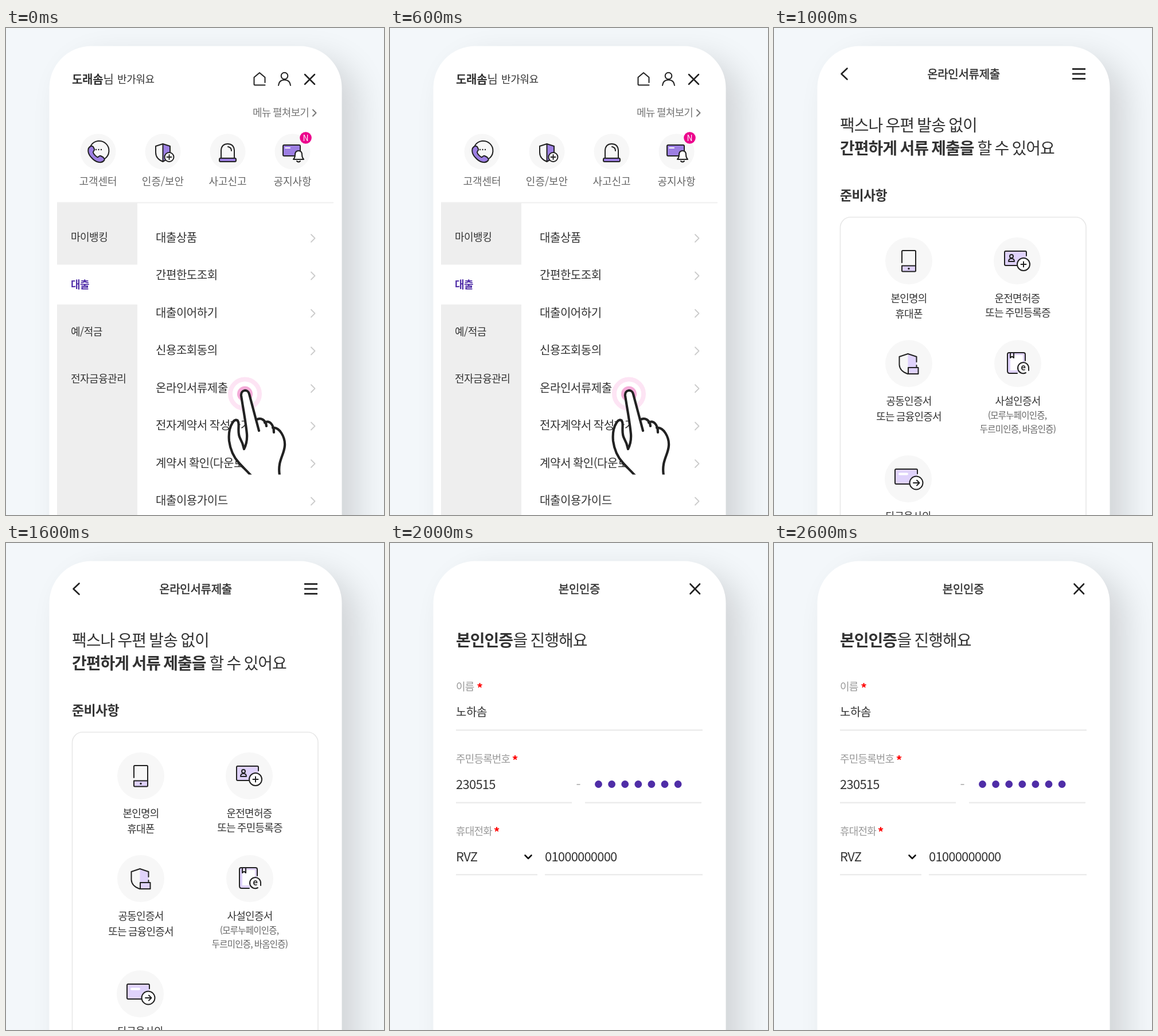
An HTML page with a canvas that plays this animation: 659x849 px, repeating every 3 s.

```html
<!DOCTYPE html>
<html lang="ko">
<head>
<meta charset="utf-8">
<style>
html, body { margin: 0; width: 100%; height: 100%; overflow: hidden; background: #f3f7fa; }
canvas { display: block; }
</style>
</head>
<body>
<canvas id="stage" width="659" height="849"></canvas>
<script>
const ctx = document.getElementById('stage').getContext('2d');
const FONT = '"Noto Sans CJK KR", "Noto Sans CJK", sans-serif';
const INK = '#222', TEXT = '#333', VIOLET = '#4f2da7', PURPLE = '#9d7fe3', LILAC = '#dfd2fb';
const SCREEN_MS = 1000;

// y is the vertical middle of the glyphs
function text(str, x, y, size, { color = TEXT, weight = 400, gap = 0, align = 'left' } = {}) {
  ctx.font = `${weight} ${size}px ${FONT}`;
  ctx.letterSpacing = `${gap}px`;
  ctx.textAlign = align;
  ctx.fillStyle = color;
  ctx.fillText(str, x, y + size * 0.38);
  if (weight === 500) {
    // a hairline outline gives the medium weight
    ctx.strokeStyle = color;
    ctx.lineWidth = 0.5;
    ctx.strokeText(str, x, y + size * 0.38);
  }
}

function shape(d, { fill, stroke = INK, width = 2 } = {}) {
  const path = new Path2D(d);
  if (fill) { ctx.fillStyle = fill; ctx.fill(path); }
  if (stroke) { ctx.strokeStyle = stroke; ctx.lineWidth = width; ctx.stroke(path); }
}

function disc(x, y, r, fill, stroke, width = 2) {
  ctx.beginPath();
  ctx.arc(x, y, r, 0, Math.PI * 2);
  if (fill) { ctx.fillStyle = fill; ctx.fill(); }
  if (stroke) { ctx.strokeStyle = stroke; ctx.lineWidth = width; ctx.stroke(); }
}

function rect(x, y, w, h, fill) {
  ctx.fillStyle = fill;
  ctx.fillRect(x, y, w, h);
}

function drawPhone() {
  rect(0, 0, 659, 849, '#f3f7fa');
  ctx.save();
  ctx.shadowColor = 'rgba(0,0,0,.14)';
  ctx.shadowBlur = 56;
  ctx.shadowOffsetX = 27;
  ctx.shadowOffsetY = 22;
  ctx.fillStyle = '#fff';
  ctx.beginPath();
  ctx.roundRect(75.5, 31.5, 510, 1000, 73);
  ctx.fill();
  ctx.restore();
}

function drawQuickIcons() {
  ['고객센터', '인증/보안', '사고신고', '공지사항'].forEach((label, i) => {
    const x = 160.5 + i * 113;
    disc(x, 215.5, 31, '#f7f7f7');
    text(label, x, 267, 18, { color: '#666', align: 'center' });
  });
  // call centre
  shape('M148 205A17 17 0 1 1 172 228');
  for (const x of [157, 161.5, 166]) disc(x, 212, 1.2, INK);
  shape('M148 206C141 209 142 219 149 226C156 234 166 237 171 231C173 229 171 227 169 225L165 223C162 222 161 226 159 225C156 223 153 220 152 217C151 215 155 214 154 211L152 207Q150 205 148 206Z', { fill: PURPLE });
  // shield
  shape('M273.5 202L286 206V219Q284 228 273.5 233Z', { fill: PURPLE, stroke: null });
  shape('M273.5 202L286 206V218Q284 228 273.5 233Q261 228 261 217V206ZM273.5 202V232');
  disc(284.5, 225, 8, '#fff', INK);
  shape('M280.5 225H288.5M284.5 221V229');
  // siren
  shape('M375 226V213Q376 202 386.500 202Q397 202 398 213V226M387 207Q393 208 393 214');
  shape('M374 227H399Q401 227 401 229V231Q401 233 399 233H374Q372 233 372 231V229Q372 227 374 227Z', { fill: PURPLE });
  // notice
  shape('M485 204H511Q513 204 513 206V221Q513 223 511 223H485Q483 223 483 221V206Q483 204 485 204Z', { fill: PURPLE });
  shape('M487 209H495', { stroke: '#fff' });
  shape('M501 229Q504 226 504 221Q504 214 510 214Q516 214 516 221Q516 226 519 229ZM507 232Q510 235 513 232', { fill: '#fff' });
  disc(522.5, 191.5, 10.3, '#ec008c');
  text('N', 522.5, 191.3, 14, { color: '#fff', align: 'center' });
}

function drawPointer() {
  disc(416.5, 638, 25.5, null, '#fde4f4', 8);
  disc(416.5, 638, 21.5, 'rgba(255,255,255,.8)');
  disc(416.5, 638, 13.5, '#f4abd8');
  ctx.save();
  ctx.beginPath();
  ctx.rect(370, 600, 140, 178.5);
  ctx.clip();
  const thumb = 'M427 780C419 771 413 766 406 758C396 747 391 735 389 720C388 709 389 697 395 688C398 683 403 681 405 687C407 693 403 706 408 715Q413 724 415 734';
  const finger = 'Q421 722 420 708C418 687 413 661 410 641C409 630 422 629 424 638L441 702';
  const palm = 'L436 683C445 678 452 684 453 688C459 683 467 691 467 698C477 695 487 714 486 728C485 745 473 754 477 780Z';
  const knuckles = 'M436 683C445 678 453 684 454 694M451 688C459 683 467 691 467 705M465 697C477 695 487 714 486 728C485 745 473 754 477 780';
  shape(thumb + finger + palm, { fill: '#fff', stroke: null });
  shape(thumb + finger, { width: 4.2 });
  shape(knuckles, { width: 4.2 });
  ctx.restore();
}

function drawMenu() {
  text('도래솜', 115, 89, 20, { weight: 700, gap: -0.3 });
  text('님', 169.5, 89, 20);
  text('반가워요', 194, 89.5, 18, { gap: -0.4 });
  shape('M451.500 99.500H434Q432.500 99.500 432.500 98V86L442 78L451.500 86V95');
  disc(485.5, 83.5, 5.8, null, INK);
  shape('M475 100Q476 90.500 485.500 90.500Q495 90.500 496 100');
  shape('M521 81L538 98M538 81L521 98', { width: 2.5 });
  text('메뉴 펼쳐보기', 430, 147.5, 18, { color: '#777', gap: -0.75 });
  shape('M535 142.500L540.500 148L535 153.500', { stroke: '#777' });
  drawQuickIcons();

  rect(89, 303.5, 482, 2, '#f0f0f0');
  rect(89, 305, 140, 107.5, '#eee');
  rect(89, 482, 140, 367, '#eee');
  ['마이뱅킹', '대출', '예/적금', '전자금융관리'].forEach((label, i) => {
    const active = i === 1;
    text(label, 113, 364.5 + i * 82.2, 18, { gap: -0.5, weight: active ? 700 : 400, color: active ? VIOLET : TEXT });
  });
  const items = ['대출상품', '간편한도조회', '대출이어하기', '신용조회동의', '온라인서류제출',
    '전자계약서 작성하기', '계약서 확인(다운로드)', '대출이용가이드'];
  items.forEach((label, i) => {
    const y = 365 + i * 65.5;
    text(label, 261, y, 20, { gap: -0.45 });
    shape(`M532 ${y - 5}L538.500 ${y + 1.5}L532 ${y + 8}`, { stroke: '#ccc', width: 1.8 });
  });
  drawPointer();
}

function drawDocumentIcons() {
  for (const [x, y] of [[235, 406], [424, 406], [235, 585], [425, 585], [234, 786]]) disc(x, y, 41, '#f7f7f7');
  // mobile
  rect(223, 414.5, 24, 10, LILAC);
  shape('M223 409V389.500Q223 388 224.500 388H245.500Q247 388 247 389.500V423Q247 424.500 245.500 424.500H224.500Q223 424.500 223 423V414.500H247');
  disc(235, 419.5, 1.7, INK);
  // identity card
  const idCard = 'M440 397V391Q440 389 438 389H404Q402 389 402 391V412Q402 414 404 414H424';
  shape(idCard + 'L440 402Z', { fill: LILAC, stroke: null });
  shape(idCard);
  disc(414, 398, 3, null, INK);
  shape('M409 407Q409 402 414 402Q419 402 419 407Z');
  disc(435, 412, 11, '#fff', INK);
  shape('M430.500 412H439.500M435 407.500V416.500');
  // joint certificate
  shape('M233.500 568L248.500 573V592H233.500Z', { fill: LILAC, stroke: null });
  shape('M248.500 582V573L233.500 568L218.500 573V587Q219 598 233 603M248.500 591V588');
  shape('M234 592H251.500V603H234Z', { fill: LILAC });
  // private certificate
  const book = 'M438 580V569Q438 566 435 566H410Q407 566 407 569V598Q407 602 411 602H424';
  shape(book + 'Z', { fill: LILAC, stroke: null });
  rect(412, 570, 22, 27, '#fff');
  shape(book + 'M412 566V575L415 572.500L418 575V566');
  disc(434.5, 593, 9.5, '#f7f7f7');
  shape('M439 601A9.500 9.500 0 1 1 444 593V597');
  text('e', 434.5, 591.5, 15, { weight: 700, align: 'center' });
  // transfer card
  const card = 'M250 777V771Q250 769 248 769H213Q211 769 211 771V793Q211 795 213 795H236';
  shape(card + 'L250 783Z', { fill: LILAC, stroke: null });
  shape(card);
  shape('M219 777.500H232', { stroke: '#fff', width: 4 });
  disc(248, 793, 11.5, '#fff', INK);
  shape('M243 793H253M249 788.500L253.500 793L249 797.500');
}

function drawDocuments() {
  shape('M127.500 70.500L117.500 80L127.500 89.500', { width: 2.6 });
  text('온라인서류제출', 330.5, 80, 20, { weight: 500, gap: -0.3, align: 'center' });
  for (const y of [71.5, 80, 88.5]) rect(520, y - 1.4, 23, 2.8, INK);
  text('팩스나 우편 발송 없이', 115, 169.5, 28, { gap: -1 });
  text('간편하게 서류 제출을', 115, 209.5, 28, { weight: 700, gap: -1 });
  text('할 수 있어요', 354.5, 209.5, 28, { gap: -1 });
  text('준비사항', 115, 291.5, 23, { weight: 700, gap: -0.7 });
  ctx.beginPath();
  ctx.roundRect(115.5, 329.8, 428.5, 700, 18);
  ctx.strokeStyle = '#e8e8e8';
  ctx.lineWidth = 1.6;
  ctx.stroke();
  drawDocumentIcons();

  const labels = [
    ['본인명의', 235, 471], ['휴대폰', 235, 498],
    ['운전면허증', 424, 471], ['또는 주민등록증', 425, 496],
    ['공동인증서', 235, 650], ['또는 금융인증서', 235, 677],
    ['사설인증서', 425, 650], ['타금융사의', 234, 851.5],
  ];
  for (const [label, x, y] of labels) text(label, x, y, 18, { gap: -0.78, align: 'center' });
  const note = { color: '#666', gap: -0.75, align: 'center' };
  text('(모루누페이인증,', 424, 675.5, 15.5, note);
  text('두르미인증, 바옴인증)', 425, 699.5, 15.5, note);
}

function drawField(label, y, starX) {
  text(label, 115, y, 18, { color: '#999', gap: -0.85 });
  text('*', starX, y + 2.5, 21, { color: '#f00', weight: 700, align: 'center' });
}

function drawIdentity() {
  text('본인인증', 330, 80, 20, { weight: 500, gap: -0.3, align: 'center' });
  shape('M523.500 71.500L540 88.500M540 71.500L523.500 88.500', { width: 2.6 });
  text('본인인증', 115, 169.5, 28, { weight: 700, gap: -1 });
  text('을 진행해요', 214.5, 169.5, 28, { gap: -1 });

  drawField('이름', 250.5, 156.5);
  text('노하솜', 115, 294, 20, { gap: -0.4 });
  drawField('주민등록번호', 376.5, 218);
  text('230515', 115, 421, 22, { gap: -0.75 });
  rect(325.5, 420, 6, 2, '#bbb');
  for (let i = 0; i < 7; i++) disc(363.5 + i * 23.1, 420.5, 6.4, VIOLET);
  drawField('휴대전화', 502, 186);
  text('RVZ', 115, 547, 22, { gap: -0.75 });
  shape('M235.500 544.500L241 550L246.500 544.500', { width: 2.6, stroke: '#111' });
  text('01000000000', 270, 547, 22, { gap: -0.8 });

  for (const [x, y, w] of [[115, 325, 430], [115, 451.5, 202], [340, 451.5, 203], [115, 577, 142], [270, 577, 275]])
    rect(x, y, w, 2.4, '#ebebeb');
}

const screens = [drawMenu, drawDocuments, drawIdentity];
let shown = -1;
const start = performance.now();

function render(now) {
  const index = Math.floor(Math.max(0, now - start) / SCREEN_MS) % screens.length;
  if (index !== shown) {
    shown = index;
    ctx.lineCap = ctx.lineJoin = 'round';
    drawPhone();
    screens[index]();
  }
  requestAnimationFrame(render);
}
render(start);
</script>
</body>
</html>
```
